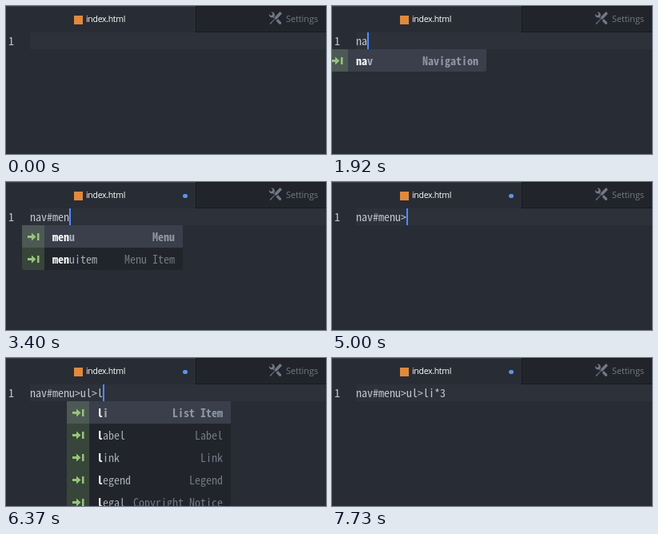
These frames come from a looping animation (400x185 px, 8000 ms). An HTML page:

```html
<!DOCTYPE html>
<html lang="en">
<head>
<meta charset="utf-8">
<title>Abbreviation typing</title>
<style>
  html, body { margin: 0; width: 100%; height: 100%; overflow: hidden; background: #282c34; }
  #stage {
    position: relative; width: 400px; height: 185px; overflow: hidden; background: #282c34;
    font: 14px/21px "Noto Sans Mono CJK JP", "Noto Sans Mono CJK SC", "Noto Sans Mono", monospace;
    color: #bfc6d2; white-space: pre; font-variant-ligatures: none;
  }
  #stage > * { position: absolute; }
  .edge { left: 0; top: 0; width: 237px; height: 1px; background: #3a3f4a; }
  .idle { left: 237px; top: 0; width: 163px; height: 33px; background: #21252b;
          border: solid #181a1f; border-width: 1px 0 1px 1px; box-sizing: border-box; }
  .title { font: 10.8px/16px "Open Sans", "Noto Sans", sans-serif; top: 8px; }
  .file { left: 100px; color: #fff; font-size: 10.5px; letter-spacing: -.3px; }
  .settings { left: 350px; color: #737985; }
  .badge { left: 85px; top: 12px; width: 11px; height: 11px; background: #e0893f; }
  .tools { left: 329px; top: 7px; fill: #737985; }
  #dot { left: 221px; top: 14.5px; width: 5.5px; height: 5.5px; border-radius: 50%; background: #5c94ea; }
  .line { left: 30px; top: 33px; width: 370px; height: 21px; background: #2c313a; }
  .number { left: 3px; top: 33px; }
  #code { left: 30px; top: 33px; }
  #cursor { top: 33px; width: 2px; height: 21px; background: #528bff; }
  #popup { top: 54px; min-width: 201px; border-radius: 0 0 3px 3px; overflow: hidden; background: #21252b; }
  .row { display: flex; height: 28px; line-height: 28px; color: #a6aeba; }
  .row svg { flex: none; background: rgba(152, 195, 121, .2); fill: #98c379; }
  .word { margin: 0 10px; }
  .word b { color: #fff; }
  .label { margin: 0 10px 0 auto; color: #737985; }
  .row:first-child { background: #3a3f4b; font-weight: bold; }
  .row:first-child .label { color: #9098a5; }
</style>
</head>
<body>
<div id="stage">
  <div class="edge"></div>
  <div class="idle"></div>
  <div class="badge"></div>
  <div class="title file">index.html</div>
  <div id="dot"></div>
  <svg class="tools" width="16" height="16" viewBox="0 0 16 16">
    <path d="M4.5 7.3L5.8 8.6 6.3 8 5.4 7.1 7.1 5.3 6.7 4.9C7 3.7 6.7 2.4 5.8 1.4 4.9.5 3.7.2 2.5.5L4.4 2.5 3.9 4.5 2 5 .1 3C-.2 4.2.1 5.5 1 6.4 1.9 7.4 3.3 7.7 4.5 7.3z"/>
    <path d="M10.9 9.2L8.6 11.5 12.4 15.5C13 16.1 14.1 16.1 14.7 15.5 15.3 14.8 15.3 13.8 14.7 13.1z"/>
    <path d="M16 2.5L13.5 0 6.3 7.5 7.2 8.4 2.9 12.8 1.9 13.4.5 15.6.9 16 3.1 14.6 3.6 13.5 7.9 9.1 8.8 10z"/>
  </svg>
  <div class="title settings">Settings</div>
  <div class="line"></div>
  <div class="number">1</div>
  <div id="code"></div>
  <div id="popup"></div>
  <div id="cursor"></div>
</div>
<script>
const LOOP = 8000, COLUMN = 7, LEFT = 30, POPUP_INSET = 38, DIRTY_AT = 2170;
const ABBREVIATION = 'nav#menu>ul>li*3';

const menu = ['menu:Menu', 'menuitem:Menu Item'];
const LISTS = {
  na: ['nav:Navigation'],
  me: [...menu, 'meta:Meta', 'meter:Meter'],
  men: menu,
  menu,
  u: ['u:Underline', 'ul:Unordered List'],
  l: ['li:List Item', 'label:Label', 'link:Link', 'legend:Legend', 'legal:Copyright Notice'],
  li: ['li:List Item', 'link:Link']
};

// time, typed characters, popup prefix, cursor hidden
const STEPS = [
  [0, 0, '', true], [1400, 0], [1770, 1], [1920, 2, 'na'], [2320, 3, 'na'], [2440, 3],
  [2900, 4], [3150, 5], [3280, 6, 'me'], [3400, 7, 'men'], [3670, 8, 'menu'],
  [4110, 8, 'menu', true], [4570, 8, 'menu'], [5000, 9], [5410, 10], [5560, 10, 'u'],
  [5710, 11, 'u'], [5830, 11], [6100, 12], [6250, 13], [6370, 13, 'l'], [6520, 14, 'li'],
  [6830, 15], [7200, 16], [7730, 16, '', true]
];

const [code, cursor, popup, dot] =
  ['code', 'cursor', 'popup', 'dot'].map(id => document.getElementById(id));
const show = (element, on) => { element.style.visibility = on ? 'visible' : 'hidden'; };

const ICON = '<svg width="28" height="28"><path d="M7 13h5v-3.5l5.5 5-5.5 5V16H7zM19 10h2.5v9H19z"/></svg>';

function rowMarkup(entry, prefix) {
  const [word, label] = entry.split(':');
  return `<div class="row">${ICON}<span class="word"><b>${prefix}</b>${word.slice(prefix.length)}</span>` +
    `<span class="label">${label}</span></div>`;
}

let current;
function draw(step) {
  if (step === current) return;
  current = step;
  const [, count, prefix, hidden] = step;
  const text = ABBREVIATION.slice(0, count);
  code.textContent = text;
  cursor.style.left = LEFT + COLUMN * count + 'px';
  show(cursor, !hidden);
  show(popup, prefix);
  popup.innerHTML = prefix ? LISTS[prefix].map(entry => rowMarkup(entry, prefix)).join('') : '';
  popup.style.left = LEFT + COLUMN * text.search(/\w*$/) - POPUP_INSET + 'px';
}

const start = performance.now();
function tick() {
  const time = (performance.now() - start) % LOOP;
  draw(STEPS.findLast(([at]) => at <= time));
  show(dot, time >= DIRTY_AT);
  requestAnimationFrame(tick);
}
tick();
</script>
</body>
</html>
```
